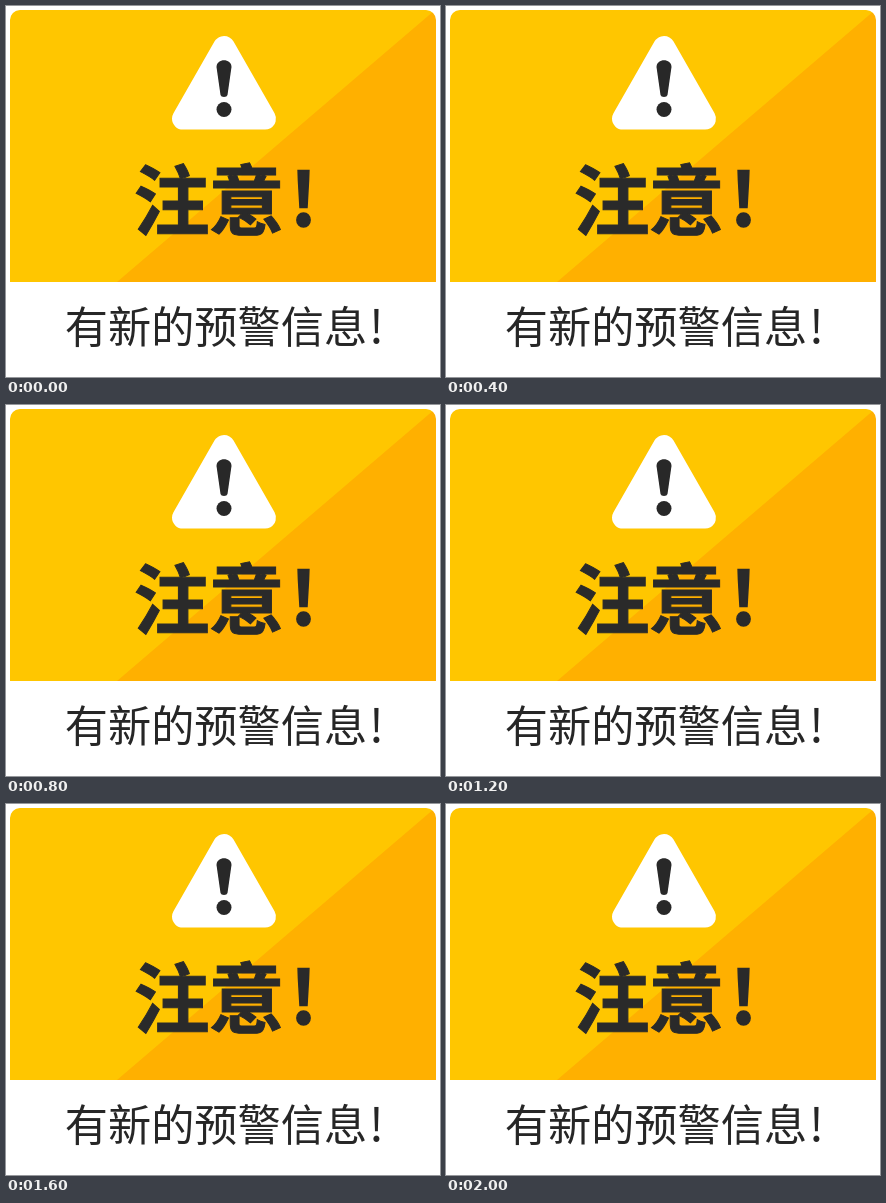
These frames come from a looping animation (434 by 371 pixels, 2.2 s). An HTML page:

```html
<!DOCTYPE html>
<html lang="zh-CN">
<head>
<meta charset="utf-8">
<title>注意</title>
<style>
  html, body { margin: 0; width: 100%; height: 100%; overflow: hidden; background: #fff; }
  svg {
    display: block; width: 434px; height: 371px;
    animation: flash 2200ms step-end infinite;
  }
  /* Hard switch every 200 ms; the calm state spans the loop seam. */
  @keyframes flash {
    0%, 18.1818%, 36.3636%, 54.5454%, 72.7272%, 90.909%, 100% {
      --panel: #ffc600; --shade: #ffb000; --sign: #fff; --title: #2a2a2a; --border: #fff;
    }
    9.0909%, 27.2727%, 45.4545%, 63.6363%, 81.8181% {
      --panel: #652b26; --shade: #4a231f; --sign: #f4ec04; --title: #fff; --border: #8c0018;
    }
  }
  .panel { fill: var(--panel); }
  .shade { fill: var(--shade); }
  .sign { fill: var(--sign); stroke: var(--sign); stroke-width: 22; stroke-linejoin: round; }
  .mark { fill: #282828; }
  .border { fill: none; stroke: var(--border); stroke-width: 4; }
  text { font-family: "Noto Sans CJK SC", "Noto Sans CJK", sans-serif; }
  .title { font-size: 76px; font-weight: 700; fill: var(--title); stroke: var(--title); stroke-width: 1; }
  .note { font-size: 43.2px; font-weight: 400; fill: #262626; }
  .bang { text-anchor: middle; }
  .title .bang { font-size: 73px; stroke-width: 1.5; }
  .note .bang { font-size: 46px; }
</style>
</head>
<body>
<svg viewBox="0 0 434 371">
  <clipPath id="top"><path d="M4 276V12a8 8 0 0 1 8-8H422a8 8 0 0 1 8 8V276Z"/></clipPath>
  <g clip-path="url(#top)">
    <rect class="panel" width="434" height="276"/>
    <path class="shade" d="M111 276L429 4H434V276Z"/>
  </g>
  <rect class="border" x="2" y="2" width="430" height="367" rx="12"/>

  <path class="sign" d="M218 41L259 112.600H177Z"/>
  <path class="mark" d="M210.500 61C210.500 52 225.500 52 225.500 61L221.500 89Q221 91 218 91T214.500 89Z"/>
  <circle class="mark" cx="218" cy="103.500" r="7.500"/>

  <g class="title">
    <text x="127.500 202.500" y="222.500">注意</text>
    <text class="bang" x="297.500" y="220">!</text>
  </g>
  <g class="note">
    <text x="58.800" y="336.500">有新的预警信息</text>
    <text class="bang" x="370.500" y="337">!</text>
  </g>
</svg>
</body>
</html>
```
